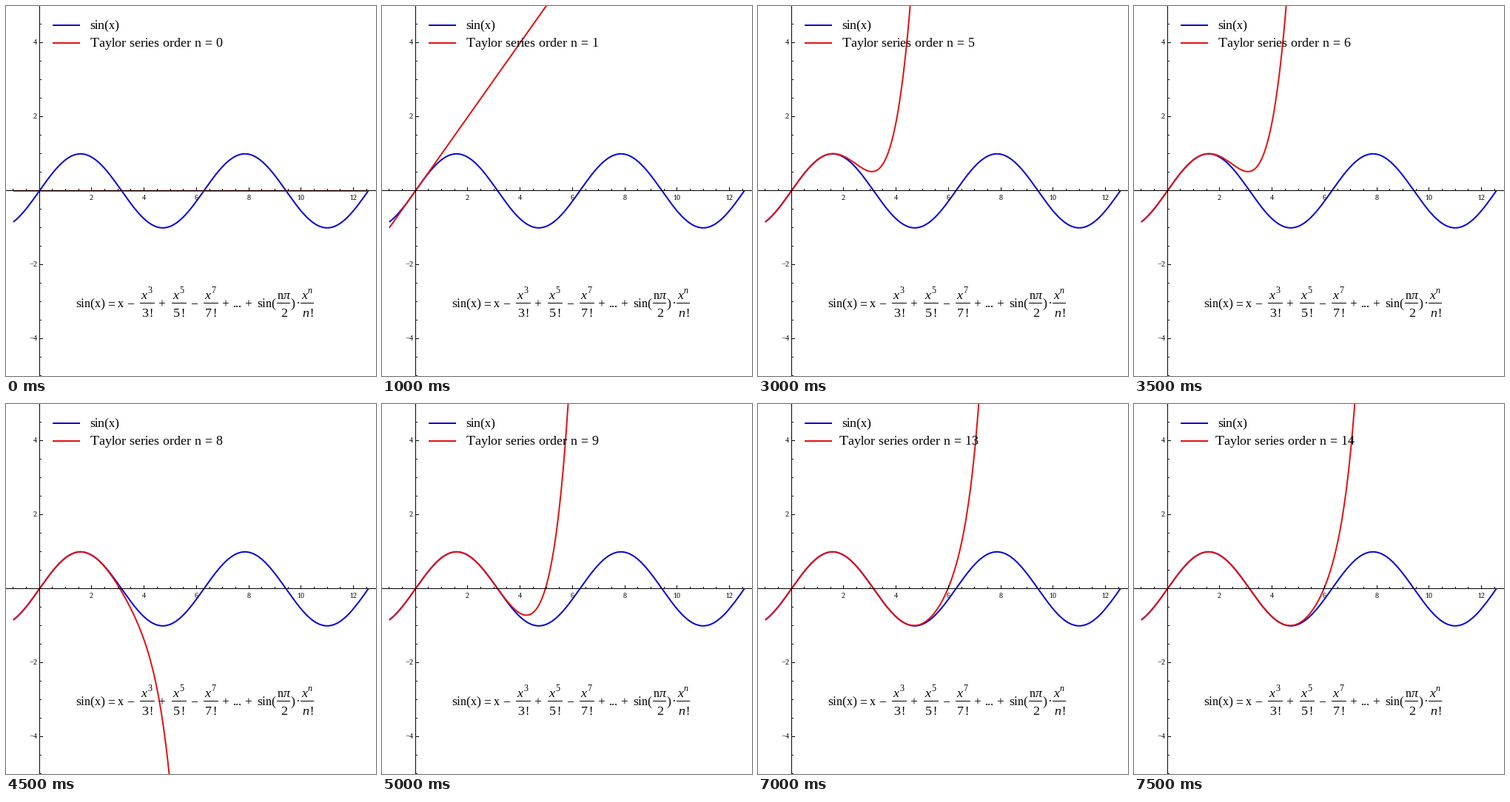
Write a matplotlib script that moves like this. It is 500 px wide and 500 px high and loops after 8000 ms.

```python
import math

import matplotlib.pyplot as plt
import numpy as np
from matplotlib.animation import FuncAnimation

SIZE, DPI = 500, 100
PX = 72 / DPI  # points per pixel
BLUE, RED = "#0606d6", "#e21212"
X0, Y0, SX, SY = 45.2, 249.8, 35.36, 50
STEP_MS, STEPS = 500, 16

# Whole-pixel glyph advances without kerning, as on a classic screen.
plt.rcParams.update({
    "font.family": "Liberation Serif",
    "text.hinting": "default",
    "text.hinting_factor": 1,
    "text.kerning_factor": 6,
})
fig = plt.figure(figsize=(SIZE / DPI, SIZE / DPI), dpi=DPI, facecolor="white")
ax = fig.add_axes([0, 0, 1, 1])
ax.set_xlim(0, SIZE)
ax.set_ylim(SIZE, 0)
ax.axis("off")


def line(xs, ys, color="black", width=1, z=3):
    return ax.plot(xs, ys, color=color, lw=width * PX, zorder=z, snap=False,
                   solid_capstyle="butt")[0]


def text(x, y, s, size=17, ha="left", style="normal"):
    return ax.text(x, y, s, fontsize=size * PX, ha=ha, va="baseline",
                   style=style, color="black", zorder=5)


def taylor_sine(x, order):
    total = np.zeros_like(x)
    for k in range(1, order + 1, 2):
        total += (-1) ** (k // 2) * x ** k / math.factorial(k)
    return total


def draw_axes():
    line([0, SIZE], [249.5, 249.5])
    line([45.5, 45.5], [0, SIZE])
    for v in np.arange(-1, 12.6, 0.5):
        major = v % 2 == 0
        x = math.floor(X0 + SX * v) + 0.5
        line([x, x], [249, 245 if major else 247])
        if major and v:
            text(x, 261.6, f"{v:.0f}", 10, ha="center")
    for v in np.arange(-5, 5.1, 0.5):
        major = v % 2 == 0
        y = math.floor(249.9 - SY * v) + 0.5
        line([46, 50 if major else 48], [y, y])
        if major and v:
            label = f"{v:.0f}".replace("-", "\u2212")
            text(42, y + 2.8, label, 10, ha="right")


def fraction(left, right, top, power, bottom):
    power_style = "italic" if power == "n" else "normal"
    line([left, right], [401.5, 401.5], z=5)
    text(left + 1.5, 396, top, style="italic")
    text(left + 10, 388.5, power, 12, style=power_style)
    text(left + 2, 419.5, bottom, style=power_style)
    text(left + 12, 419.5, "!")


def draw_formula():
    for x, s in [(94, "sin(x)"), (137, "="), (151, "x"), (163, "\u2212"),
                 (206, "+"), (249, "\u2212"), (292, "+"), (307, "..."),
                 (323, "+"), (339, "sin("), (384.5, ")"), (391, "\u00b7")]:
        text(x, 407, s)
    for left, power in [(181, "3"), (224, "5"), (267, "7")]:
        fraction(left, left + 20, "x", power, power)
    fraction(398, 416, "x", "n", "n")
    line([366, 384], [401.5, 401.5], z=5)
    text(366.5, 396, "n")
    text(375, 396, "\u03c0", style="italic")
    text(371, 419.5, "2")


xs = np.linspace(-1, 4 * math.pi, 900)
px = X0 + SX * xs
draw_axes()
draw_formula()
line(px, Y0 - SY * np.sin(xs), BLUE, 2, z=1)
approx = line(px, np.full_like(px, Y0), RED, 2, z=2)
line([63, 100], [26, 26], BLUE, 2)
line([63, 100], [50, 50], RED, 2)
sine_label = text(133, 31, "sin(x)", 18, ha="center")
order_label = text(203.8, 55, "", 18, ha="center")


def update(step):
    order = max(0, step - 1)
    approx.set_ydata(np.clip(Y0 - SY * taylor_sine(xs, order), -2000, 2500))
    order_label.set_text(f"Taylor series order n = {order}")
    sine_label.set_x(133.5 if order >= 10 else 133)
    return approx, order_label, sine_label


anim = FuncAnimation(fig, update, frames=STEPS, interval=STEP_MS,
                     repeat=True, repeat_delay=0)
plt.show()
```
